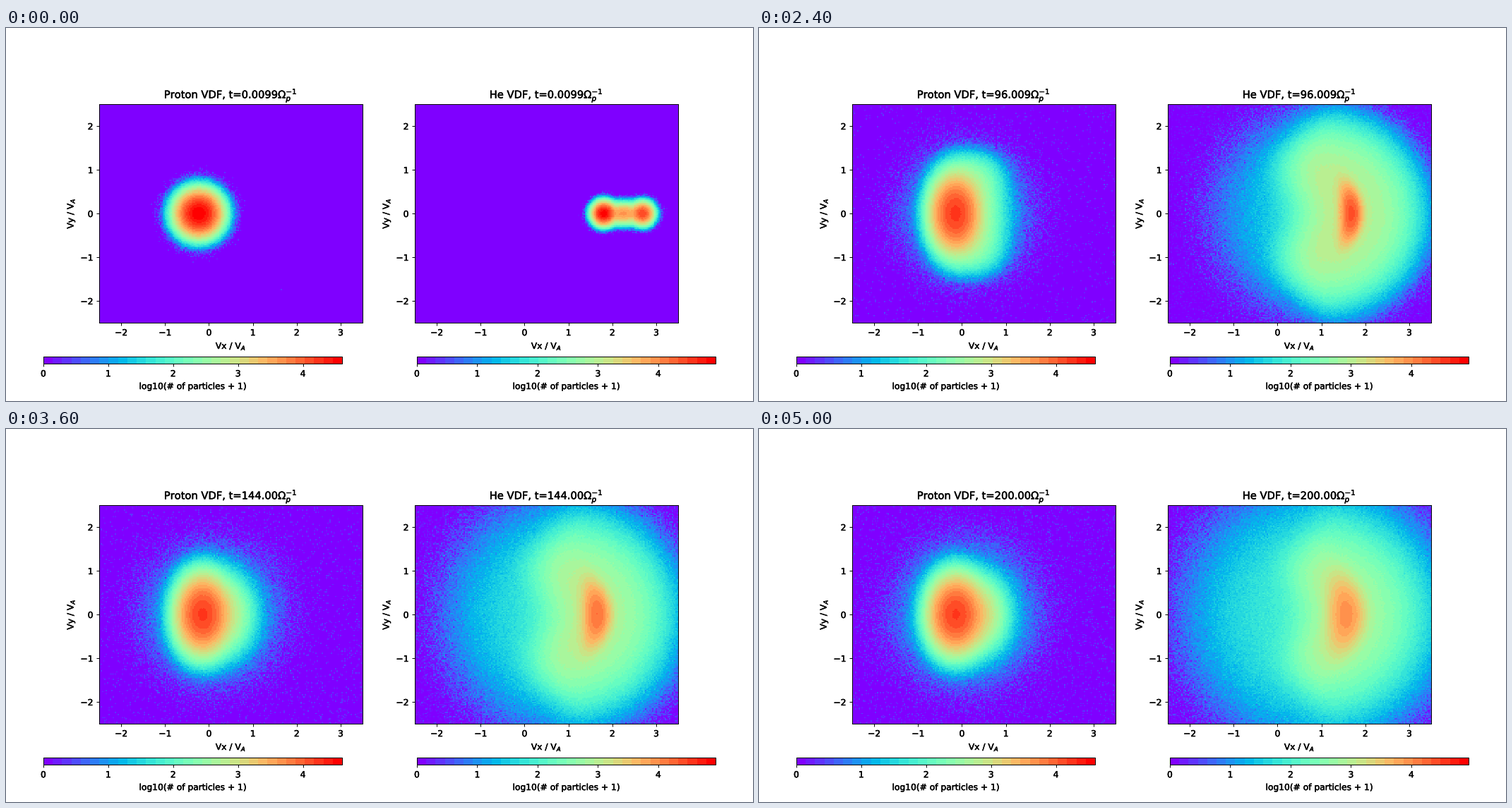
Recreate the animation shown at these times as a matplotlib script. Size 1058 by 529 pixels, loop 5.2 s.

```python
import numpy as np
import matplotlib.pyplot as plt
from matplotlib.animation import FuncAnimation
from matplotlib.patheffects import withStroke
from matplotlib.text import Text

W, H = 1058, 529
FRAMES, INTERVAL = 26, 200
BINS, BANDS = 200, 32
XLIM, YLIM = (-2.5, 3.5), (-2.5, 2.5)


def centres(lo, hi):
    step = (hi - lo) / BINS
    return lo + step * (np.arange(BINS) + 0.5)


X, Y = np.meshgrid(centres(*XLIM), centres(*YLIM))


# All density parts are log10 of the expected particle count per bin.
def blob(peak, x0, ax, ay, bend=0.0, y0=0.0, power=2):
    dy = np.abs(Y - y0)
    return peak - ax * (X - x0 - bend * dy**2)**2 - ay * dy**power


def shell(peak, a, p, cut=1.0):
    """Disc around x = 1.07 whose left side is worn away, least at mid height."""
    r = np.hypot(X - 1.07, Y)
    depth = np.maximum(1.35 - X - 0.38 * np.sin(1.3 * Y)**2, 0)
    return peak - a * r**p - cut * depth**1.6


def halo(peak, a):
    return peak - a * np.hypot(X - 0.9, Y)**3


def total(floor, *parts):
    return np.log10(10.0**floor + sum(10.0**part for part in parts))


PROTON_REST = total(-5, blob(4.58, -0.23, 5.3, 5.3))
PROTON = [
    (10, PROTON_REST),
    (36, PROTON_REST),
    (48, total(-4.5, blob(4.45, -0.19, 5.2, 3.2), blob(1.6, 0.1, 4, 2, 0.1))),
    (64, total(-3.2, blob(4.25, -0.14, 4.8, 1.75),
               blob(2.6, 0.05, 2.1, 0.42, 0.12, power=4),
               blob(0.2, 0.1, 0.6, 0.5))),
    (96, total(-1.4, blob(4.22, -0.15, 3.95, 1.65),
               blob(2.7, 0.22, 2.1, 0.36, power=4), blob(1.6, 0.1, 0.6, 0.6))),
    (128, total(-1.25, blob(4.2, -0.15, 3.7, 1.65),
                blob(2.9, 0.27, 2.3, 1.3), blob(1.7, 0.1, 0.57, 0.57))),
    (160, total(-1.15, blob(4.2, -0.15, 3.5, 1.65),
                blob(3.1, 0.29, 2.4, 1.5), blob(1.75, 0.1, 0.54, 0.53))),
    (200, total(-1.05, blob(4.18, -0.15, 3.35, 1.65),
                blob(3.2, 0.3, 2.4, 1.6), blob(1.8, 0.1, 0.52, 0.5))),
]

HELIUM = [
    (8, total(-5, blob(4.9, 1.807, 22, 22), blob(4.45, 2.69, 22, 22),
              blob(3.9, 2.25, 5, 23))),
    (32, total(-5, blob(4.9, 1.807, 22, 22), blob(4.38, 2.68, 22, 8.6),
               blob(3.9, 2.25, 5, 18))),
    (48, total(-3.5, blob(4.6, 1.76, 18, 5, -0.3), shell(3.1, 0.09, 4.2, 1.6))),
    (64, total(-2.2, blob(4.35, 1.64, 15, 2.5, -0.3, power=4),
               shell(3.1, 0.085, 3.8), halo(0.6, 0.1),
               blob(0.75, -0.48, 9, 14, y0=0.62))),
    (96, total(-0.95, blob(4.38, 1.68, 14, 2.1, -0.25), shell(3.05, 0.095, 3.4),
               halo(1.5, 0.075))),
    (128, total(-0.85, blob(4.22, 1.67, 10, 1.75, -0.25), shell(3.0, 0.11, 3.1),
                halo(1.7, 0.06))),
    (160, total(-0.8, blob(4.07, 1.63, 7, 1.4, -0.22), shell(2.95, 0.14, 2.8),
                halo(1.78, 0.048))),
    (200, total(-0.75, blob(3.92, 1.57, 5, 1.1, -0.2), shell(2.95, 0.175, 2.5),
                halo(1.85, 0.04))),
]


def density(keys, t):
    times = [key[0] for key in keys]
    pos = np.interp(t, times, range(len(keys)))
    i = min(int(pos), len(keys) - 2)
    w = pos - i
    return (1 - w) * keys[i][1] + w * keys[i + 1][1]


def histogram(keys, t, seed):
    rng = np.random.default_rng(seed)
    return np.log10(rng.poisson(10.0**density(keys, t)) + 1)


def clock(k):
    # single precision time with a slight drift, cut to six characters
    t = np.float32(8 * k * (1 - 2e-8) + 0.01)
    return f"{float(t):.12f}"[:6]


plt.rcParams["font.family"] = "DejaVu Sans"
plt.rcParams["xtick.major.pad"] = 3.1
fig = plt.figure(figsize=(12, 6), dpi=W / 12, facecolor="white")


def panel(left, bar_left, vmax):
    ax = fig.add_axes([left / W, 1 - 418 / H, 373 / W, 310 / H])
    image = ax.imshow(np.zeros((BINS, BINS)), origin="lower", aspect="auto",
                      extent=XLIM + YLIM, interpolation="nearest",
                      cmap=plt.get_cmap("rainbow", BANDS), vmin=0, vmax=vmax)
    ax.set_xticks(range(-2, 4))
    ax.set_yticks(range(-2, 3))
    ax.set_xlabel("Vx / V$_A$")
    ax.set_ylabel("Vy / V$_A$")
    bar = fig.add_axes([bar_left, 0.1, 0.4, 0.02])
    fig.colorbar(image, cax=bar, orientation="horizontal", ticks=range(5),
                 label="log10(# of particles + 1)")
    return ax, image


PANELS = [
    ("Proton", PROTON, *panel(132, 0.05, 4.605)),
    ("He", HELIUM, *panel(579, 0.55, 4.95)),
]


def update(k):
    for n, (name, keys, ax, image) in enumerate(PANELS):
        image.set_data(histogram(keys, 8 * k, 100 * n + k))
        ax.set_title(f"{name} VDF, t={clock(k)}" + r"$\Omega_p^{-1}$")
    return [p[3] for p in PANELS]


# slightly heavier lettering
update(0)
fig.canvas.draw()
for text in fig.findobj(Text):
    text.set_path_effects([withStroke(linewidth=0.4, foreground="black")])

anim = FuncAnimation(fig, update, frames=FRAMES, interval=INTERVAL,
                     init_func=lambda: update(0), repeat=True, repeat_delay=0)
plt.show()
```
